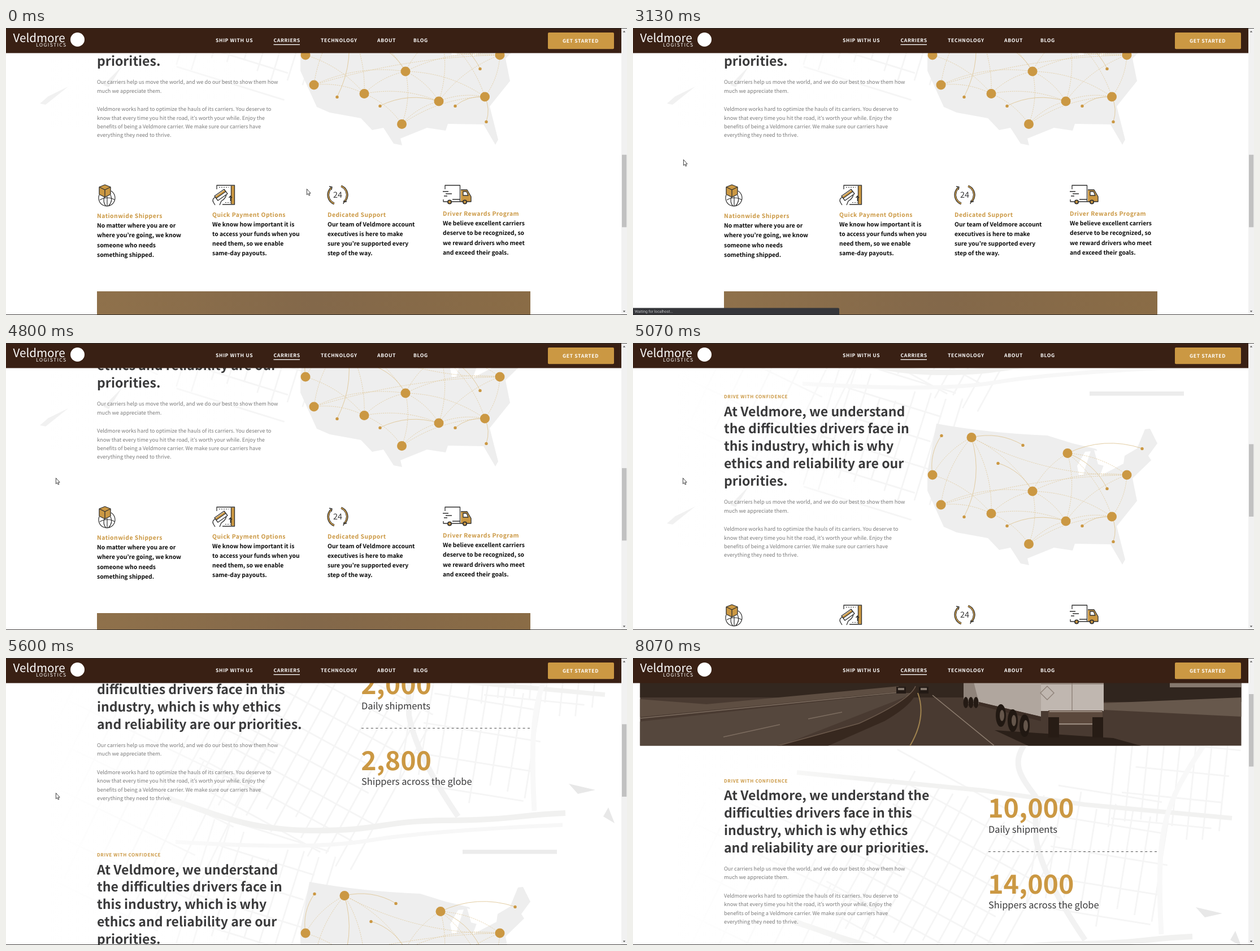
Write an HTML page with a canvas that moves like this. It is 1099 px wide and 509 px high and loops after 8870 ms.

```html
<!DOCTYPE html>
<html lang="en">
<head>
<meta charset="utf-8">
<title>Carriers page</title>
<style>
html, body { margin: 0; width: 100%; height: 100%; overflow: hidden; background: #fff; }
#stage { position: relative; width: 1099px; height: 509px; overflow: hidden; background: #fff; }
#page, #art, #copy, #chrome { position: absolute; left: 0; top: 0; }
text {
  font-family: "Noto Sans CJK JP", "Noto Sans CJK SC", "Noto Sans CJK", "Noto Sans", sans-serif;
  text-rendering: geometricPrecision;
  white-space: pre;
}
</style>
</head>
<body>
<div id="stage">
  <div id="page">
    <canvas id="art" width="1099" height="1180"></canvas>
    <svg id="copy" width="1099" height="1180"></svg>
  </div>
  <svg id="chrome" width="1099" height="509"></svg>
</div>
<script>
const $ = id => document.getElementById(id);
const page = $('page'), art = $('art'), copy = $('copy'), chrome = $('chrome');
const GOLD = '#cb9843', DARK = '#3a3a3b', GREY = '#7b7b7b', INK = '#2f2f2f';

function el(parent, tag, attrs) {
  const node = document.createElementNS('http://www.w3.org/2000/svg', tag);
  for (const k in attrs) node.setAttribute(k, attrs[k]);
  return parent.appendChild(node);
}

function label(parent, x, y, str, size, fill, weight = 400, spacing = 0, more = {}) {
  const node = el(parent, 'text', {
    x, y, fill, 'font-size': size, 'font-weight': weight, 'letter-spacing': spacing, ...more
  });
  node.textContent = str;
  return node;
}

function lines(x, y, step, rows, ...style) {
  rows.forEach((row, i) => label(copy, x, y + i * step, row, ...style));
}

/* ---------- page text ---------- */

function section(y, heading) {
  label(copy, 161, y, 'DRIVE WITH CONFIDENCE', 8.06, GOLD, 700, 0.62);
  lines(161, y + 31.5, 30.9, heading, 23.05, DARK, 700);
  const body = y + 32.6 + heading.length * 30.9;
  lines(161, body, 15.44, [
    'Our carriers help us move the world, and we do our best to show them how',
    'much we appreciate them.'
  ], 9.22, GREY);
  lines(161, body + 48, 15.44, [
    'Veldmore works hard to optimize the hauls of its carriers. You deserve to',
    'know that every time you hit the road, it’s worth your while. Enjoy the',
    'benefits of being a Veldmore carrier. We make sure our carriers have',
    'everything they need to thrive.'
  ], 9.22, GREY);
}

section(220.5, ['At Veldmore, we understand the', 'difficulties drivers face in this',
  'industry, which is why ethics', 'and reliability are our priorities.']);
section(571, ['At Veldmore, we understand', 'the difficulties drivers face in',
  'this industry, which is why', 'ethics and reliability are our', 'priorities.']);

const stats = [[10000, 'Daily shipments'], [14000, 'Shippers across the globe']].map(([goal, name], i) => {
  const y = 283.4 + i * 134.4;
  label(copy, 629, y + 26.6, name, 16.38, DARK);
  return { goal, node: label(copy, 628.2, y, '', 46.5, GOLD, 700) };
});
el(copy, 'path', { d: 'M629 343.5H928', stroke: '#505050', 'stroke-width': 1.2, 'stroke-dasharray': '4 4.4' });

[
  [996, 'Nationwide Shippers', ['No matter where you are or', 'where you’re going, we know',
    'someone who needs', 'something shipped.']],
  [993.7, 'Quick Payment Options', ['We know how important it is', 'to access your funds when you',
    'need them, so we enable', 'same-day payouts.']],
  [993.7, 'Dedicated Support', ['Our team of Veldmore account', 'executives is here to make',
    'sure you’re supported every', 'step of the way.']],
  [992, 'Driver Rewards Program', ['We believe excellent carriers', 'deserve to be recognized, so',
    'we reward drivers who meet', 'and exceed their goals.']]
].forEach(([y, title, rows], i) => {
  const x = 161 + i * 204;
  label(copy, x, y, title, 10.37, GOLD, 700, 0.48);
  lines(x, y + 17.3, 17.1, rows, 10.37, '#0a0a0a', 700);
});
label(copy, 587, 960.2, '24', 14.5, DARK, 400, 0, { 'text-anchor': 'middle' });

const tan = el(el(copy, 'defs', {}), 'linearGradient', { id: 'tan' });
['#8f714b', '#83684a', '#8a6c46'].forEach((color, i) => el(tan, 'stop', { offset: i / 2, 'stop-color': color }));
el(copy, 'rect', { x: 161, y: 1126, width: 767, height: 54, fill: 'url(#tan)' });

/* ---------- page artwork ---------- */

const c = art.getContext('2d');

function fill(d, color) {
  c.fillStyle = color;
  c.fill(new Path2D(d));
}

function stroke(d, color, width, dash = []) {
  c.strokeStyle = color;
  c.lineWidth = width;
  c.setLineDash(dash);
  c.stroke(new Path2D(d));
}

function disc(x, y, rx, color, ry = rx) {
  c.beginPath();
  c.ellipse(x, y, rx, ry, 0, 0, 7);
  c.fillStyle = color;
  c.fill();
}

function box(x, y, w, h, color) {
  c.fillStyle = color;
  c.fillRect(x, y, w, h);
}

let seed = 7;
const random = () => (seed = seed * 16807 % 2147483647) / 2147483647;

// a turned block of streets with some stretches missing
function district(x, y, reach, angle, gap) {
  c.save();
  c.translate(x, y);
  c.rotate(angle);
  for (const [step, turn] of [[gap, 0], [gap * 1.7, Math.PI / 2]]) {
    c.save();
    c.rotate(turn);
    for (let u = -reach; u <= reach; u += step) {
      const from = -reach * (0.6 + 0.4 * random()), to = reach * (0.6 + 0.4 * random());
      stroke(`M${u} ${from}V${to}`, '#f5f5f5', 2.8);
    }
    c.restore();
  }
  c.restore();
}

function city() {
  district(530, 390, 170, 0.5, 26);
  district(830, 360, 120, 0.16, 32);
  district(960, 215, 110, 0.1, 28);
  district(450, 650, 120, 0.3, 28);
  district(230, 480, 190, 0.45, 44);
  stroke('M290 203L620 235L800 260L1060 284', '#f2f2f1', 8);
  stroke('M692 155C668 190 690 215 712 245L713 320Q725 390 800 500', '#f2f2f2', 10);
  stroke('M1010 155C940 260 925 300 935 490', '#f8f8f8', 9);
  stroke('M285 468C360 490 420 525 545 525S660 508 780 507S900 498 990 494', '#f1f1f0', 10);
  stroke('M300 545Q540 560 640 543T985 515', '#f7f7f7', 7);
  const fade = c.createLinearGradient(80, 0, 430, 0);
  fade.addColorStop(0, '#fff');
  fade.addColorStop(1, 'rgba(255,255,255,0)');
  box(0, 155, 430, 680, fade);
  fill('M60 793L75 780L110 763L70 795ZM172 760L205 727L182 764Z', '#f1f1f1');
  fill('M996 442L1043 453L1012 460ZM1057 500L1066 484L1077 512Z', '#e8e8e8');
  box(808, 559, 167, 7.5, '#ececec');
}

function photo() {
  c.save();
  c.beginPath();
  c.rect(12.5, 0, 1064, 155.5);
  c.clip();
  box(0, 0, 1099, 156, '#493a31');
  box(0, 0, 600, 70, '#33271f');
  fill('M0 72L130 82L470 50V60L0 106Z', '#5e4e42');
  fill('M0 114L470 62H500L260 156H0Z', '#55473d');
  stroke('M12 107L470 61M310 108L370 96M160 140L260 118', '#7d6d60', 1.4);
  fill('M500 50Q510 74 445 112L345 156H255L400 116Q490 75 500 50Z', '#37281f');
  stroke('M255 156L400 116Q490 75 500 50', '#6c5a4c', 1.5);
  stroke('M504 62Q520 105 490 156', '#a0834f', 2);
  stroke('M530 66L640 156', '#8e7e70', 1.6);
  box(833, 0, 244, 78, '#30251e');
  box(950, 0, 127, 52, '#85786e');
  fill('M833 80L1077 70V104L833 92Z', '#67584c');
  fill('M640 128L850 142L900 156H700Z', '#2b2019');
  box(585, 0, 28, 82, '#8f837a');
  fill('M592 0H722V104L612 78Z', '#b0a69e');
  fill('M612 78L722 104V112L612 84Z', '#3d2e26');
  box(722, 0, 111, 94, '#c0b7b0');
  stroke('M777 0V94M722 46H833M733 50L745 62L733 74L721 62Z', '#8d8178', 1.4);
  box(735, 93, 96, 26, '#5b483c');
  stroke('M737 95H830M750 117H818', '#998b80', 2);
  for (let i = 0; i < 3; i++) {
    disc(651 + i * 21, 102 + i * 9, 9, '#211812', 20);
    disc(653 + i * 21, 102 + i * 9, 4, '#65564b', 10);
    disc(589 + i * 9, 79, 4.5, '#241a14', 10);
  }
  for (const x of [735, 813]) box(x, 105, 19, 36, '#271c15');
  for (const x of [466, 506]) {
    box(x, 51, 17, 12, '#231a15');
    box(x + 3, 53, 11, 4, '#83776d');
  }
  c.restore();
}

const hubs = [[599, 167.5], [530, 234], [545, 287], [634, 302.5], [707, 263], [769, 195.5],
  [874, 234], [766, 316], [847.5, 308], [700.5, 356.5]];
// town position and the hub that serves it
const towns = [[546, 164, 1], [690, 181, 0], [646, 213, 4], [586, 308, 0], [662, 324, 7],
  [795, 324, 8], [839, 258, 5], [850, 352, 8], [901, 187, 5]];

function arc(a, b, bend) {
  const dx = b[0] - a[0], dy = b[1] - a[1], k = dx < -40 ? -bend : bend;
  return `M${a[0]} ${a[1]}Q${(a[0] + b[0]) / 2 + dy * k} ${(a[1] + b[1]) / 2 - dx * k} ${b[0]} ${b[1]}`;
}

function usMap() {
  c.save();
  c.translate(0, 473);
  fill(`M537 143Q630 160 733 164L778 178L820 188L833 217L826 236L868 214L870 200L892 187L906 153L915 152
    L928 178L912 200L917 208L884 240L892 280L856 325L871 384L866 393L845 357L782 356L778 368L745 363
    L698 382L701 394L686 391L668 363L648 367L628 346L573 336L550 326L521 262V228Z`, '#eeeeee');
  fill('M800 193L810 192L800 222L797 234H789L786 218ZM816 190L838 195L834 218L823 215Z', '#fff');

  const pale = '#dfc797', link = d => stroke(d, pale, 0.8, [2.2, 1.5]);
  hubs.forEach((a, i) => hubs.slice(i + 1).forEach(b => {
    const far = Math.hypot(b[0] - a[0], b[1] - a[1]);
    if (far > 76 && far < 170) link(arc(a, b, 0.15));
  }));
  link(arc(hubs[0], hubs[6], -0.13));
  link(arc(hubs[2], hubs[6], 0.07));
  for (const town of towns) stroke(arc(hubs[town[2]], town, 0.2), pale, 0.9);
  for (const [x, y] of towns) disc(x, y + 0.4, 2.7, GOLD);
  for (const [x, y] of hubs) disc(x, y, 8.5, GOLD);
  c.restore();
}

function icons() {
  c.save();
  c.translate(0, 659);
  c.lineJoin = 'round';

  // globe with parcel
  stroke('M165 296A14.5 14.5 0 1 0 186 289M179 299V316M166 305Q179 297 193 305M174 300Q171 309 177 316'
    + 'M185 296Q190 307 181 316', INK, 1.2);
  const parcel = 'M175 278L185 282V295L175 300L165 295V282Z';
  fill(parcel, GOLD);
  stroke(parcel + 'M165 282L175 287L185 282M175 287V300', INK, 1.3);

  // card payment
  box(399, 280, 5, 32, GOLD);
  stroke('M373 286V279H404.5V313H383M398.5 280V312M397.3 307V298M394.5 301L397.3 298L400 301', INK, 1.3);
  stroke('M377 282.5H394M388 309.5H397', INK, 1.2, [2, 2]);
  const card = 'M369 298L386 286L392 294L375 306Z';
  fill(card, '#fff');
  fill('M370 299L387 287L389 290L372 302Z', GOLD);
  stroke(card + 'M372 302L389 290M370 300Q364 304 367 309L370 314M390 296Q388 303 381 307L378 314', INK, 1.3);

  // round the clock
  for (const [r, color, width] of [[16.8, GOLD, 2.4], [18, INK, 1.2], [15.4, INK, 1]])
    for (const turn of [0, Math.PI]) {
      c.beginPath();
      c.arc(587, 296, r, turn - 1.2, turn + 0.85);
      c.strokeStyle = color;
      c.lineWidth = width;
      c.setLineDash([]);
      c.stroke();
    }
  stroke('M572 281L577 282L576 287M597 312L598 307L603 308', INK, 1.3);

  // lorry
  fill('M805 287H816L823 299V308H805Z', GOLD);
  fill('M809 290H815L818 297H809Z', '#fff');
  stroke('M777 286V279H803.5V308M805 287H816L823 299V308H789M781 308H774V304M809 290H815L818 297H809Z'
    + 'M773 290H783M778 294H789M775 298H781M803 304H790', INK, 1.3);
  for (const x of [785, 812]) {
    disc(x, 308.5, 4, INK);
    disc(x, 308.5, 2.2, GOLD);
  }
  c.restore();
}

city();
photo();
usMap();
icons();

/* ---------- fixed parts ---------- */

const head = el(chrome, 'g', {});
const strip = el(head, 'rect', { width: 1089, height: 44.5, fill: '#392014' });
const menu = el(head, 'g', {});
label(menu, 12.5, 25, 'Veldmore', 20.6, '#fff');
label(menu, 53, 33.3, 'LOGISTICS', 8.6, '#fff', 400, 1.35);
el(menu, 'circle', { cx: 126.5, cy: 20.5, r: 12.5, fill: '#fff' });
el(menu, 'rect', { x: 473.5, y: 28.8, width: 46.5, height: 1.3, fill: '#fff' });
el(menu, 'rect', { x: 959, y: 8, width: 117, height: 29.3, rx: 2, fill: GOLD });
const caps = (x, y, str) => label(menu, x, y, str, 8.65, '#fff', 700, 0.62);
caps(371, 24.5, 'SHIP WITH US');
caps(473.5, 24.5, 'CARRIERS');
caps(557, 24.5, 'TECHNOLOGY');
caps(657, 24.5, 'ABOUT');
caps(721, 24.5, 'BLOG');
caps(985, 26.2, 'GET STARTED');

el(chrome, 'rect', { x: 1089, width: 10, height: 509, fill: '#f1f1f1' });
const thumb = el(chrome, 'rect', { x: 1090, width: 8.2, height: 128.5, fill: '#c1c1c1' });
el(chrome, 'path', { d: 'M1091.7 7.5L1094 5L1096.3 7.5ZM1091.7 501.5L1094 504L1096.3 501.5Z', fill: '#505050' });
const status = el(chrome, 'g', {});
el(status, 'path', { d: 'M0 496.5H363Q365 496.5 365 498.5V509H0Z', fill: '#35363a' });
label(status, 3, 505.3, 'Waiting for localhost...', 6.8, '#c4c5c8', 400, 0,
  { style: 'font-family: Roboto, "Open Sans", sans-serif' });
el(chrome, 'path', { d: 'M0 .4H1099M0 508.5H1099', stroke: '#2c2a29', 'stroke-width': 0.9 });
const cursor = el(chrome, 'path', {
  d: 'M.4 .5V10.8L2.7 8.7L4.2 12.2L5.8 11.5L4.3 8.1H7.2Z',
  fill: '#fff', stroke: '#111', 'stroke-width': 0.8, 'stroke-linejoin': 'round'
});

/* ---------- timeline ---------- */

const LOOP = 8870, TICK = 1000 / 15;
const linear = p => p, speedUp = p => p * p, slowDown = p => 1 - (1 - p) ** 2;
const smooth = p => p * p * (3 - 2 * p);

const clamp = (v, lo, hi) => Math.min(hi, Math.max(lo, v));
const ramp = (t, from, to) => clamp((t - from) / (to - from), 0, 1);
const within = (t, from, to) => t >= from && t < to;

// each move: start, end, easing, goal
function glide(value, moves, t) {
  for (const [from, to, ease, goal] of moves) value += (goal - value) * ease(ramp(t, from, to));
  return value;
}

const scrollMoves = [[4709, 5066, speedUp, 473], [5190, 5600, linear, 219], [5600, 5733, linear, 0]];
const mouseTimes = [[200, 930, smooth], [1000, 1600, speedUp], [2000, 2660, slowDown],
  [4100, 4330, linear], [7610, 8060, speedUp]];
const path = goals => mouseTimes.map((m, i) => [...m, goals[i]]);
const mouseX = path([332, 80, 89, 88, 20]), mouseY = path([215, -20, 233, 239, 520]);

function counts(t) {
  const n = t < 5700 ? 3 : clamp(Math.floor((t - 5658) / 101), 1, 15);
  for (const s of stats) s.node.textContent = Math.round(s.goal * n / 15).toLocaleString('en-US');
}

function draw(now) {
  const t = Math.floor((now % LOOP) / TICK + 0.01) * TICK;
  const scroll = Math.round(glide(659, scrollMoves, t));
  page.style.transform = `translateY(${-scroll}px)`;
  thumb.setAttribute('y', 64 + scroll * 0.244);
  cursor.setAttribute('transform', `translate(${glide(532, mouseX, t)} ${glide(285, mouseY, t)})`);

  // reload: images drop out briefly, then the header settles
  const bare = within(t, 3520, 3590), loose = within(t, 3590, 3925);
  art.style.visibility = head.style.visibility = bare ? 'hidden' : 'visible';
  strip.setAttribute('height', loose ? 46 : 44.5);
  menu.setAttribute('transform', `translate(0 ${loose ? 1 : 0})`);

  status.style.opacity = ramp(t, 2000, 2200) - ramp(t, 4200, 4465);
  counts(t);
}

const start = performance.now();
function loop() {
  draw(performance.now() - start);
  requestAnimationFrame(loop);
}
loop();
</script>
</body>
</html>
```
